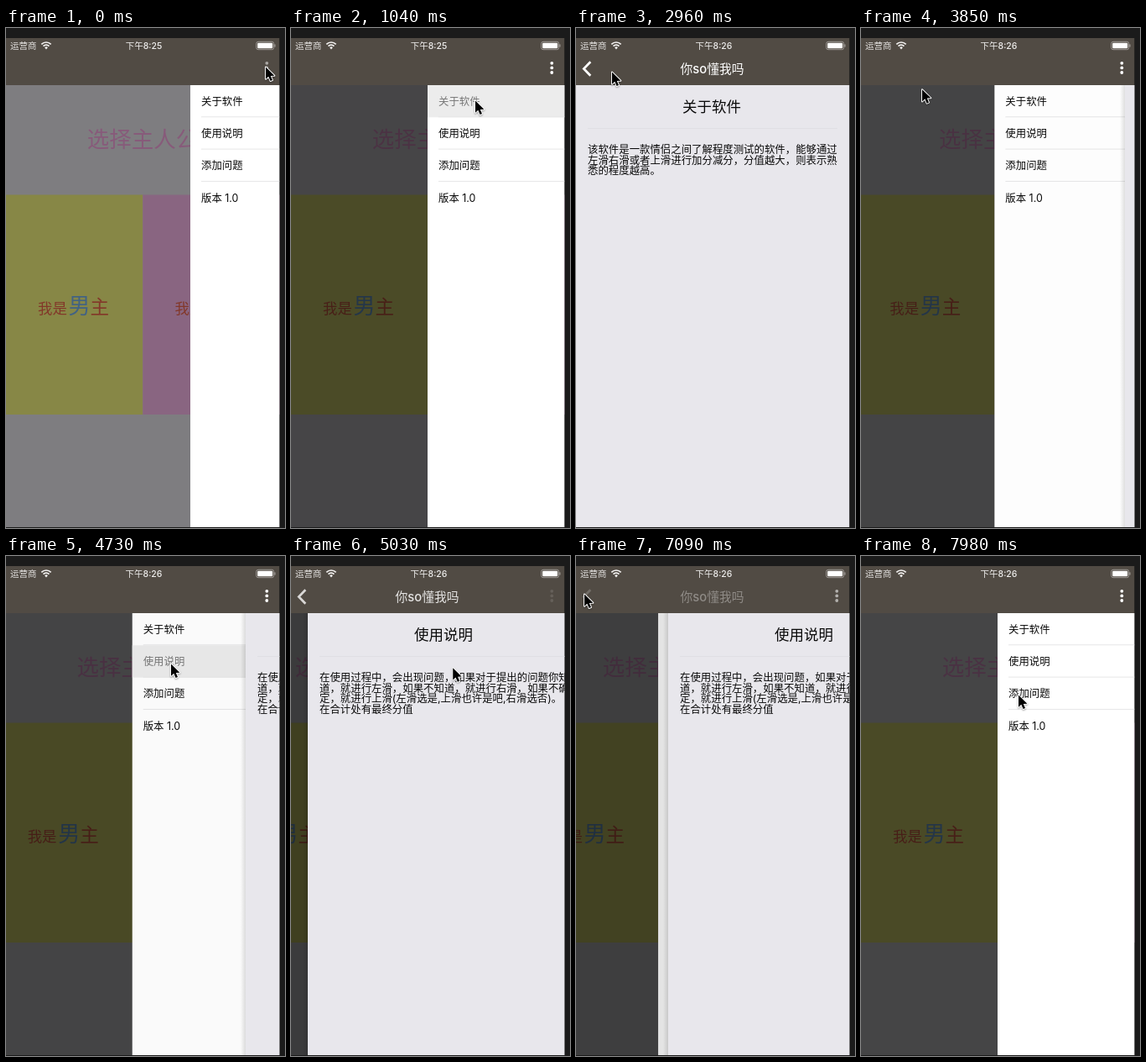
Animation, 333 px wide and 595 px high, one loop 8 s. Source, as an HTML page with a canvas:

```html
<!DOCTYPE html>
<html lang="zh-CN">
<head>
<meta charset="utf-8">
<style>
html, body { margin: 0; width: 100%; height: 100%; overflow: hidden; background: #1b1b1b; }
canvas { display: block; width: 333px; height: 595px; }
</style>
</head>
<body>
<canvas id="stage"></canvas>
<script>
const W = 333, H = 595, LOOP = 8000, STEP = 147.7;
const APP = { w: 326.5, top: 12, bar: 68, bottom: 594 };
const FONT = 'Inter, "Noto Sans CJK SC", "Noto Sans CJK", "Noto Sans", sans-serif';
const BODY_SIZE = 12.42;
const MENU = ['关于软件', '使用说明', '添加问题', '版本 1.0'];
const PAGES = [
  { title: MENU[0], lines: [
    '该软件是一款情侣之间了解程度测试的软件，能够通过',
    '左滑右滑或者上滑进行加分减分，分值越大，则表示熟',
    '悉的程度越高。'] },
  { title: MENU[1], lines: [
    '在使用过程中，会出现问题，如果对于提出的问题你知',
    '道，就进行左滑，如果不知道，就进行右滑，如果不确',
    '定，就进行上滑(左滑选是,上滑也许是吧,右滑选否)。',
    '在合计处有最终分值'] }
];
// Pointer path: [step, x, y]
const PATH = [
  [0, 310, 46], [1, 308, 47], [5, 220, 86], [8, 220, 86], [13, 182, 158],
  [15, 182, 158], [20, 43, 52], [23, 11, 45], [24, 11, 45], [30, 197, 128],
  [33, 197, 128], [37, 182, 147], [38, 182, 147], [40, 82, 105],
  [41, 82, 105], [46, 10, 45], [48, 10, 45], [54, 188, 165]
];

const canvas = document.getElementById('stage');
const dpr = window.devicePixelRatio || 1;
canvas.width = W * dpr;
canvas.height = H * dpr;
const c = canvas.getContext('2d');

const rect = (x, y, w, h, color) => { c.fillStyle = color; c.fillRect(x, y, w, h); };

function text(str, x, midY, size, color, align = 'left', weight = 400) {
  c.font = `${weight} ${size}px ${FONT}`;
  c.textAlign = align;
  c.fillStyle = color;
  c.fillText(str, x, midY + size * 0.38);
}

function withAlpha(alpha, draw) {
  c.save();
  c.globalAlpha = alpha;
  draw();
  c.restore();
}

// Critically damped spring from 0 to 1
const settle = x => x <= 0 ? 0 : 1 - (1 + x) * Math.exp(-x);
const spring = (step, start, phase) => step < start ? 0 : settle(phase + 1.95 * (step - start));

function pointerAt(step) {
  const i = PATH.findIndex(p => p[0] >= step);
  if (i < 0) return PATH[PATH.length - 1].slice(1);
  if (i === 0) return PATH[0].slice(1);
  const [a, ax, ay] = PATH[i - 1], [b, bx, by] = PATH[i];
  const u = (step - a) / (b - a);
  return [ax + (bx - ax) * u, ay + (by - ay) * u];
}

function home() {
  rect(0, APP.bar, APP.w, APP.bottom - APP.bar, '#e8e7ec');
  text('选择主人公', 163, 132, 26.5, '#f8a6e0', 'center');
  rect(0, 198.5, 163.3, 261.5, '#f8f880');
  rect(163.3, 198.5, 163.2, 261.5, '#fcbaee');
  for (const [x, who] of [[38, '男'], [201.5, '女']]) {
    text('我是', x, 333.5, 17.4, '#f0664c');
    text(who, x + 36.5, 330, 26, '#78b4f2');
    text('主', x + 62.5, 331.5, 22.5, '#f0664c');
  }
}

function drawer(x, selected) {
  rect(x, APP.bar, APP.w - x, APP.bottom - APP.bar, '#fff');
  MENU.forEach((label, i) => {
    const y = APP.bar + 38.3 * i;
    const on = i === selected;
    if (on) rect(x, y, APP.w - x, 38.3, '#ececec');
    if (i < 3) rect(x + 13, y + 37.3, APP.w - x - 13, 1, '#e6e6e7');
    text(label, x + 13, y + 19, 12.4, on ? '#777' : '#0a0a0a');
  });
}

function page(x, { title, lines }) {
  const shade = c.createLinearGradient(x - 6, 0, x, 0);
  shade.addColorStop(0, 'rgba(0,0,0,0)');
  shade.addColorStop(1, 'rgba(0,0,0,0.12)');
  if (x > 0) rect(x - 6, APP.bar, 6, APP.bottom - APP.bar, shade);
  rect(x, APP.bar, APP.w, APP.bottom - APP.bar, '#e8e7ec');
  text(title, x + 162, 93, 17.5, '#0a0a0a', 'center');
  rect(x + 14, 119, 298, 1, '#dfdfe4');
  lines.forEach((line, i) => text(line, x + 14, 144.5 + 12.5 * i, BODY_SIZE, '#0a0a0a'));
}

function statusBar(clock) {
  text('运营商', 5, 21, 10.5, '#e4e2e0');
  text(clock, 164.5, 21, 10.5, '#f0efee', 'center', 500);
  c.strokeStyle = '#f4f3f2';
  c.lineWidth = 1.7;
  for (const r of [8, 4.9]) {
    c.beginPath();
    c.arc(48, 25, r, -Math.PI * 0.75, -Math.PI * 0.25);
    c.stroke();
  }
  c.fillStyle = '#f4f3f2';
  c.beginPath();
  c.moveTo(48, 25.5);
  c.arc(48, 25, 2.6, -Math.PI * 0.75, -Math.PI * 0.25);
  c.fill();
  c.strokeStyle = '#a5a19d';
  c.lineWidth = 0.9;
  c.beginPath();
  c.roundRect(298.8, 16.3, 20.8, 9.4, 2.2);
  c.stroke();
  c.fillStyle = '#fff';
  c.beginPath();
  c.roundRect(300.2, 17.7, 18, 6.6, 1);
  c.fill();
  rect(320.4, 19.4, 1.1, 3.2, '#a5a19d');
}

function navBar(push, pressed, clock) {
  rect(0, APP.top, APP.w, APP.bar - APP.top, '#514b44');
  statusBar(clock);
  withAlpha(pressed ? 0.5 : 1 - push ** 2, () => {
    c.fillStyle = '#fff';
    for (const y of [41.8, 47.4, 53]) {
      c.beginPath();
      c.arc(311.3, y, 1.9, 0, Math.PI * 2);
      c.fill();
    }
  });
  withAlpha(push ** 2.5, () => text('你so懂我吗', 162.5, 48.5, 14.8, '#fff', 'center', 500));
  withAlpha(push ** 4, () => {
    c.strokeStyle = '#fff';
    c.lineWidth = 2.7;
    c.beginPath();
    c.moveTo(17.3, 40.3);
    c.lineTo(9.3, 48.5);
    c.lineTo(17.3, 56.7);
    c.stroke();
  });
}

function pointer([x, y]) {
  c.save();
  c.translate(x, y);
  c.beginPath();
  for (const [px, py] of [[0, 0.5], [0, 14.8], [3.3, 11.7], [5.6, 17], [8, 16], [5.8, 10.9], [10.4, 10.7]]) c.lineTo(px, py);
  c.closePath();
  c.lineJoin = 'round';
  c.shadowColor = 'rgba(0,0,0,0.35)';
  c.shadowBlur = 2 * dpr;
  c.shadowOffsetY = dpr;
  c.strokeStyle = '#fff';
  c.lineWidth = 1.9;
  c.stroke();
  c.shadowColor = 'transparent';
  c.fillStyle = '#000';
  c.fill();
  c.restore();
}

function render(time) {
  const step = Math.floor((time % LOOP) / STEP);
  const second = step >= 31;
  const open = spring(step, 0, 2.24);
  const push = second
    ? spring(step, 32, 0.61) - spring(step, 48, 1.2)
    : spring(step, 8, 0.61) - spring(step, 24, 1.2);
  const selected = step >= 7 && step < 14 ? 0 : step >= 32 && step < 38 ? 1 : -1;

  c.setTransform(dpr, 0, 0, dpr, 0, 0);
  rect(0, 0, W, H, '#1b1b1b');
  c.save();
  c.beginPath();
  c.rect(0, APP.top, APP.w, APP.bottom - APP.top);
  c.clip();

  c.save();
  c.translate(-98 * push, 0);
  home();
  rect(0, APP.bar, APP.w, APP.bottom - APP.bar, `rgba(0,0,0,${0.7 * open})`);
  drawer(Math.round(327 - 164 * open), selected);
  c.restore();

  if (push > 0.001) {
    rect(0, APP.bar, APP.w, APP.bottom - APP.bar, `rgba(0,0,0,${0.16 * push})`);
    page(Math.round(327 * (1 - push)), PAGES[second ? 1 : 0]);
  }
  navBar(Math.max(0, push), step < 1, step < 10 ? '下午8:25' : '下午8:26');
  c.restore();
  pointer(pointerAt(step));
}

const start = performance.now();
function tick() {
  render(performance.now() - start);
  requestAnimationFrame(tick);
}
tick();
</script>
</body>
</html>
```
